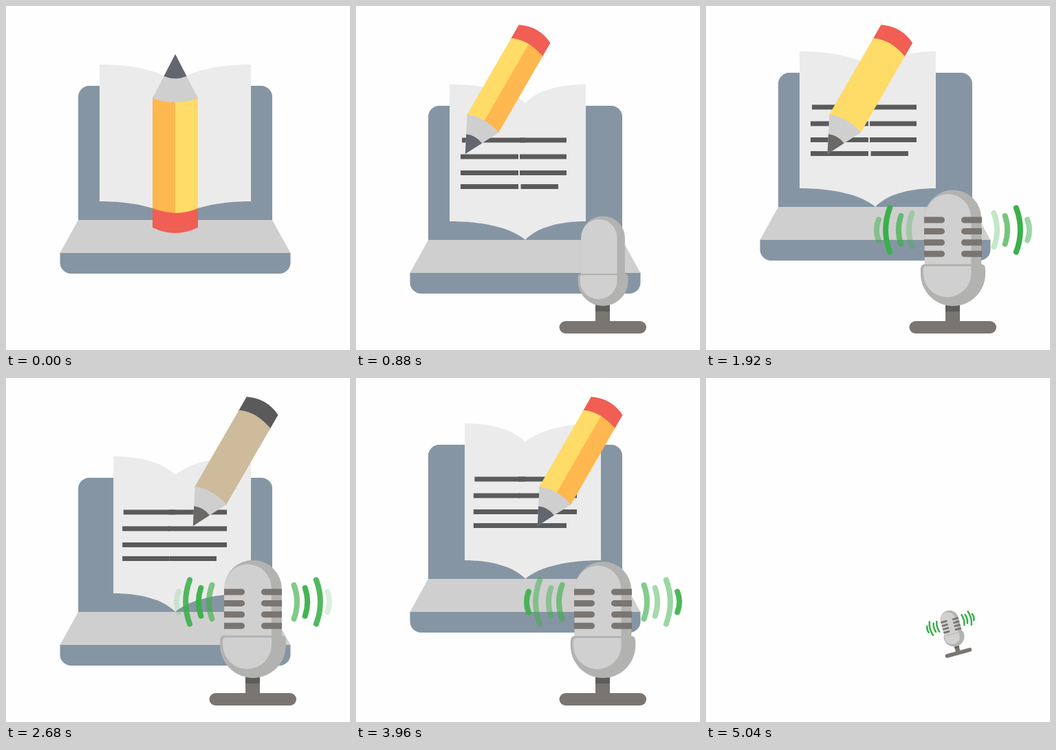
An HTML page for the animation above (5.08 s loop, 500 px wide and 500 px high).

```html
<!DOCTYPE html>
<html lang="en">
<head>
<meta charset="utf-8">
<title>Writing and recording</title>
<style>
html, body { margin: 0; height: 100%; overflow: hidden; background: #fefefe }
svg { display: block; width: 100%; height: 100% }
.text { stroke: #5a5a5a; stroke-width: 7 }
</style>
</head>
<body>
<svg viewBox="0 0 500 500">
  <g id="desk">
    <g id="laptop">
      <path fill="#8695a3" d="M105 311V132a16 16 0 0 1 16-16H371a16 16 0 0 1 16 16V311zM78.500 358.500H413.500V373a16 16 0 0 1-16 16H94.500a16 16 0 0 1-16-16z"/>
      <path fill="#cfcfcf" d="M105 311H387L413.500 359H78.500z"/>
      <g id="pageL">
        <path fill="#ebebeb" d="M-110 85C-65 85-22 93 .3 112V311C-22 292-65 284-110 284z"/>
        <path class="text" d="M-92 166H12M-94 190H-10M-94 213.500H-10M-94 233.500H-10"/>
      </g>
      <g id="pageR">
        <path fill="#ebebeb" d="M110 85C65 85 22 93 0 112V311C22 292 65 284 110 284z"/>
        <path class="text" d="M-10 166H75M-10 190H75M-10 213.500H75M-8 233.500H60"/>
      </g>
    </g>
    <g id="pencil">
      <path id="cap" d="M-33 90H33V122Q0 138-33 122z"/>
      <path id="shade" d="M-33-68H1V101Q-17 100-33 94z"/>
      <path id="body" d="M0-68H33V94Q17 101 0 101z"/>
      <path fill="#cfcfcf" d="M0-130L33-66Q0-54-33-66z"/>
      <path id="lead" d="M0-130L16.500-98Q0-91-16.500-98z"/>
    </g>
  </g>
  <g id="mic">
    <g id="waves" fill="none" stroke="#3bb04a" stroke-width="8" stroke-linecap="round"></g>
    <g id="neck">
      <path fill="#7a7571" d="M348 430H369V462H348z"/>
      <path fill="#5d5e5b" d="M348 430H369V444H348z"/>
    </g>
    <rect id="base" x="295.500" y="458" width="126.500" height="18" rx="9" fill="#7a7571"/>
    <g id="head">
      <path fill="#b2b3b1" d="M317 376V306a42 42 0 0 1 84 0V376z"/>
      <path fill="#cfd0cf" d="M317 376V306a34.500 36 0 0 1 69 0V376z"/>
      <path fill="#b2b3b1" d="M317 374H401q6 0 6 8V388a48 48 0 0 1-96 0V382q0-8 6-8z"/>
      <path fill="#cfd0cf" d="M319 377H386V387.500a35.500 35.500 0 0 1-71 0V381q0-4 4-4z"/>
    </g>
    <g id="slits" fill="#7a7571"></g>
  </g>
</svg>
<script>
const LOOP = 5080, STEP = 40, TAU = 2 * Math.PI;
const PULSE = 855; // period of the sound rings
const parts = {};
for (const el of document.querySelectorAll('[id]')) parts[el.id] = el;
const texts = document.querySelectorAll('.text');

// Sound rings from inside out
const rings = [
  { half: 24.5, bulge: 9, phase: 113 },
  { half: 20.5, bulge: 7, phase: 66 },
  { half: 32, bulge: 12, phase: 0 },
  { half: 15, bulge: 6, phase: -90 },
];
parts.waves.innerHTML = rings.map(({ half, bulge }, i) => {
  const arc = side => `M${359 + side * (59.5 + 16.2 * i)} ${325.5 - half}q${side * bulge} ${half} 0 ${2 * half}`;
  return `<path d="${arc(-1)}${arc(1)}"/>`;
}).join('');
for (let i = 0; i < 4; i++) {
  const y = 306.5 + 16.4 * i;
  parts.slits.innerHTML += `<path d="M317 ${y}h25.500a4.500 4.500 0 0 1 0 9H317zM401 ${y}h-25.500a4.500 4.500 0 0 0 0 9H401z"/>`;
}

const progress = (t, from, to) => Math.max(0, Math.min(1, (t - from) / (to - from)));
const mix = (a, b, p) => a + (b - a) * p;

function ramp(t, from, to) {
  const p = progress(t, from, to);
  return p * p * (3 - 2 * p);
}

// Ease that first swings slightly the other way
function backIn(p) {
  return p * p * (2.8 * p - 1.8);
}

const move = (el, value) => el.setAttribute('transform', value);
const fade = (el, value) => el.setAttribute('opacity', value);
const scaleAt = (el, x, y, sx, sy = sx) =>
  move(el, `translate(${x} ${y}) scale(${sx} ${sy}) translate(${-x} ${-y})`);

function paintPencil(t) {
  const flat = t > 1500 && t < 3900, drab = t > 2400 && t < 2920;
  const body = drab ? '#cdbb9c' : '#ffdb67';
  const fills = {
    body,
    shade: flat ? body : '#ffb74f',
    cap: drab ? '#5a5a5a' : '#f05e54',
    lead: flat ? '#6b6866' : '#63666e',
  };
  for (const id in fills) parts[id].setAttribute('fill', fills[id]);
}

function drawDesk(t) {
  const enter = ramp(t, 120, 800);
  const writing = enter - ramp(t, 3960, 4578);
  const bob = writing * (5 + 24 * Math.cos(1.5 * TAU * progress(t, 1170, 3405)));
  scaleAt(parts.desk, 246, 250, 1 - ramp(t, 4640, 5000));
  move(parts.laptop, `translate(0 ${bob})`);

  // The page away from the pencil stays wide
  const narrowL = ramp(t, 1960, 2840) - ramp(t, 3960, 4500);
  const narrowR = enter - ramp(t, 1960, 2500);
  move(parts.pageL, `translate(246 0) scale(${1 - .2 * narrowL} 1)`);
  move(parts.pageR, `translate(246 0) scale(${1 - .2 * narrowR} 1)`);
  texts.forEach(el => fade(el, ramp(t, 480, 800) - ramp(t, 3960, 4240)));

  const lineX = 206 + 113 * ramp(t, 1580, 2680) + bob / 6;
  const x = mix(246, lineX, enter - ramp(t, 3960, 4650));
  const y = mix(200, 125, writing);
  move(parts.pencil, `translate(${x} ${y}) rotate(${-150 * writing}) scale(${1 - .2 * writing})`);
  paintPencil(t);
}

function drawMic(t) {
  const turn = 4.6 * ramp(t, 4080, 4400) - 20 * ramp(t, 4440, 5080);
  const size = 1 - backIn(progress(t, 4080, 5115));
  move(parts.mic, `translate(359 370) rotate(${turn}) scale(${size}) translate(-359 -370)`);

  const breath = .99 + .01 * Math.cos(TAU * (t - 3040) / 2500);
  scaleAt(parts.base, 358.75, 467, ramp(t, 120, 500));
  scaleAt(parts.neck, 358.5, 460, 1, ramp(t, 400, 640));
  scaleAt(parts.head, 359, 436, breath * ramp(t, 600, 1010));
  fade(parts.slits, ramp(t, 1040, 1240));

  const steady = ramp(t, 3760, 4200);
  rings.forEach(({ phase }, i) => {
    const cycle = (t - 1920) / PULSE + phase / 360;
    const glow = cycle < -.5 ? 0 : .5 + .5 * Math.cos(TAU * cycle);
    fade(parts.waves.children[i], mix(glow, 1, steady));
  });
}

const start = performance.now();
function frame() {
  const t = Math.floor((performance.now() - start) % LOOP / STEP) * STEP;
  drawDesk(t);
  drawMic(t);
  requestAnimationFrame(frame);
}
frame();
</script>
</body>
</html>
```
